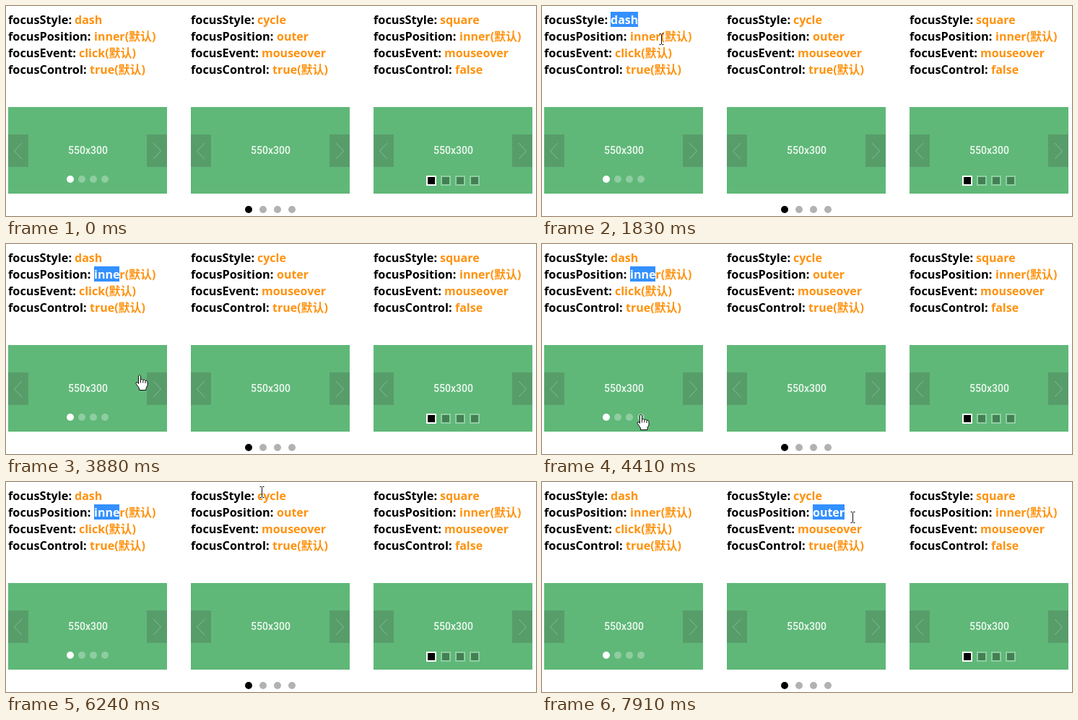
These frames come from a looping animation (734 by 291 pixels, 8000 ms). An HTML page:

```html
<!DOCTYPE html>
<html lang="zh-CN">
<head>
<meta charset="utf-8">
<title>Carousel options</title>
<style>
html, body { margin: 0; width: 100%; height: 100%; overflow: hidden; background: #fff; }
svg { display: block; width: 100%; height: 100%; }
.key, .val { font: bold 16px "Open Sans", "Noto Sans CJK SC", "Noto Sans CJK", sans-serif; }
.key { font-size: 16.3px; }
.val { fill: #ff920e; }
#picked .val { fill: #fff; }
.size { font: 500 14px Roboto, "Open Sans", sans-serif; fill: #eff8f1; text-anchor: middle; }
</style>
</head>
<body>
<svg viewBox="0 0 734 291" preserveAspectRatio="none">
  <defs><clipPath id="range"><rect id="clip" height="21"/></clipPath></defs>
  <g id="panels"></g>
  <rect id="mark" height="21" fill="#3390ff"/>
  <g id="picked" clip-path="url(#range)"></g>
  <g id="cursor">
    <path id="arrow" d="M.5 .5V16.5L4.3 13L7 19L9.6 17.9L7 12H11.8Z" fill="#fff" stroke="#111" stroke-linejoin="round"/>
    <path id="beam" d="M-3 -7.5H-1L0 -6.5L1 -7.5H3M0 -6.5V6.5M-3 7.5H-1L0 6.5L1 7.5H3" fill="none" stroke="#111"/>
    <g id="hand" stroke="#111" stroke-linejoin="round">
      <path d="M-1.5 1.5Q0 -.8 1.5 1.5V7Q3.4 5.5 4.8 7.6Q6.8 6.3 8 8.4Q10.5 7.3 11 10V15L9 18.5V21.5H-.5V19L-5 12.5Q-5 9.8 -2.8 10.8L-1.5 12.5Z" fill="#fff"/>
      <path d="M1.5 7V11.5M4.8 8V11.5M8 9V12" fill="none"/>
    </g>
  </g>
</svg>
<script>
const LOOP = 8000;
const $ = id => document.getElementById(id);

const options = [['focusStyle:', 92], ['focusPosition:', 119], ['focusEvent:', 98], ['focusControl:', 113]];
const panels = [
  { x: 3, values: ['dash', 'inner(默认)', 'click(默认)', 'true(默认)'] },
  { x: 256, values: ['cycle', 'outer', 'mouseover', 'true(默认)'] },
  { x: 509, values: ['square', 'inner(默认)', 'mouseover', 'false'] }
];

const four = draw => [0, 1, 2, 3].map(draw).join('');
const text = (kind, x, row, s) => `<text class="${kind}" x="${x}" y="${25 + row * 23}">${s}</text>`;
const labels = p => four(i => text('key', p.x, i, options[i][0]));
const values = p => four(i => text('val', p.x + options[i][1], i, p.values[i]));
const dots = (x, y, gap, color) => four(i =>
  `<circle cx="${x + i * gap}" cy="${y}" r="5" fill="${color}" opacity="${i ? 0.3 : 1}"/>`);
const squares = (x, y) => four(i => `<g opacity="${i ? 0.3 : 1}">
  <rect x="${x + i * 20}" y="${y}" width="14" height="14" fill="#fff"/></g>
  <rect x="${x + i * 20 + 2}" y="${y + 2}" width="10" height="10" fill="${i ? '#438054' : '#000'}"/>`);
const slide = p => `<g transform="translate(${p.x} 140)">
  <path d="M0 0H220V120H0Z" fill="#5fb878"/>
  <path d="M0 38H28V83H0ZM192 38H220V83H192Z" fill="#579d6a"/>
  <path d="M19 50L8.5 61L19 72M201 50L211.5 61L201 72" fill="none" stroke="#8fc4a0" stroke-width=".8"/>
  <text class="size" x="110.5" y="65">550x300</text></g>`;

$('panels').innerHTML = panels.map(p => labels(p) + values(p) + slide(p)).join('')
  + dots(89, 240, 16, '#fff') + dots(336, 282, 20, '#000') + squares(582, 235);
$('picked').innerHTML = panels.map(values).join('');

// Each move begins where the last one ended: start, end, pointer, x, y, bend of the path
const moves = [
  [340, 340, 'arrow', 222, 23],
  [340, 720, 'arrow', 141, 16, 0.28],
  [900, 960, 'arrow', 102, 13],
  [1130, 1250, 'arrow', 98, 16],
  [1250, 1830, 'beam', 165, 46],
  [2080, 2620, 'beam', 129, 47],
  [3300, 3360, 'beam', 123, 46],
  [3640, 3880, 'arrow', 185, 181],
  [3880, 4410, 'hand', 137, 236, -0.4],
  [4500, 4500, 'arrow', 148, 240],
  [4750, 5200, 'hand', 187, 238, 0.25],
  [5200, 5550, 'hand', 237, 192],
  [5550, 6130, 'beam', 375, 11],
  [6130, 6240, 'beam', 354, 14],
  [6240, 6420, 'beam', 351, 17],
  [6600, 6750, 'beam', 348, 18],
  [6750, 7330, 'beam', 401, 20],
  [7670, 7730, 'beam', 376, 44],
  [7730, 7910, 'beam', 430, 49]
].map(([start, end, shape, x, y, bend = 0]) => ({ start, end, shape, x, y, bend }));

// Text selections: press, release, cleared, panel, row, letters in the word
const drags = [
  [890, 1250, 2140, 0, 0, 4],
  [2140, 3360, 6710, 0, 1, 5],
  [6750, 7330, 7670, 1, 0, 5],
  [7730, 7910, LOOP, 1, 1, 5]
].map(([press, release, clear, panel, row, letters]) => {
  const word = $('picked').children[panel * 4 + row];
  const edges = Array.from({ length: letters }, (_, i) => word.getStartPositionOfChar(i).x);
  edges.push(word.getEndPositionOfChar(letters - 1).x);
  return { press, release, clear, row, edges: edges.map(Math.round) };
});

function pointerAt(t) {
  const i = moves.findLastIndex(m => m.start <= t);
  if (i < 0) return { shape: '', x: 0, y: 0 };
  const to = moves[i], from = moves[i - 1] || to;
  const k = to.end > to.start ? Math.min(1, (t - to.start) / (to.end - to.start)) : 1;
  const dx = to.x - from.x, dy = to.y - from.y;
  const arc = 2 * k * (1 - k) * to.bend;
  return { shape: to.shape, x: from.x + dx * k - dy * arc, y: from.y + dy * k + dx * arc };
}

const nearest = (edges, x) =>
  edges.reduce((best, e) => Math.abs(e - x) < Math.abs(best - x) ? e : best);

function selectionAt(t) {
  const drag = drags.find(d => d.press <= t && t < d.clear);
  if (!drag) return { left: 0, width: 0, row: 0 };
  const anchor = nearest(drag.edges, pointerAt(drag.press).x);
  const focus = nearest(drag.edges, pointerAt(Math.min(t, drag.release)).x);
  return { left: Math.min(anchor, focus), width: Math.abs(anchor - focus), row: drag.row };
}

function render(t) {
  const { shape, x, y } = pointerAt(t);
  const shift = shape === 'beam' ? 0.5 : 0;
  $('cursor').setAttribute('transform', `translate(${Math.round(x) + shift} ${Math.round(y)})`);
  for (const id of ['arrow', 'beam', 'hand']) $(id).style.display = id === shape ? '' : 'none';

  const { left, width, row } = selectionAt(t);
  for (const id of ['mark', 'clip']) {
    $(id).setAttribute('x', left);
    $(id).setAttribute('y', 8 + row * 23);
    $(id).setAttribute('width', width);
  }
}

const began = performance.now();
function frame() {
  render((performance.now() - began) % LOOP);
  requestAnimationFrame(frame);
}
frame();
</script>
</body>
</html>
```
